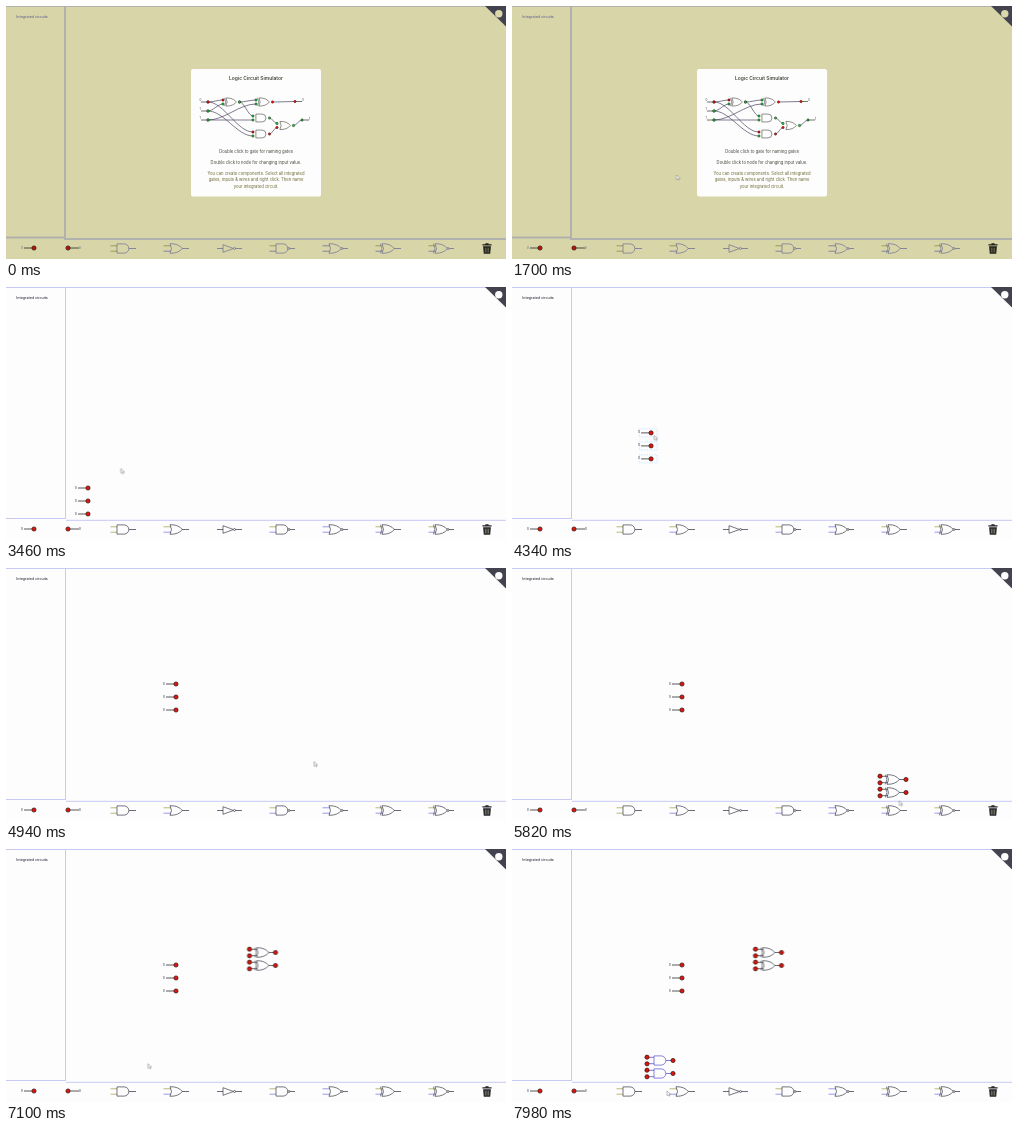
Recreate the animation shown at these times as an HTML page. Size 500 by 253 pixels, loop 8000 ms.

```html
<!DOCTYPE html>
<html lang="en">
<head>
<meta charset="utf-8">
<title>Logic Circuit Simulator</title>
<style>
  html, body { margin: 0; width: 100%; height: 100%; overflow: hidden; background: #fdfdfe; }
  svg { display: block; width: 100vw; height: 100vh; color: #3c3c48; }
  text { font-family: Inter, "Open Sans", sans-serif; fill: currentColor; }
  .body { fill: #fdfdfe; stroke: currentColor; stroke-width: .7; }
  .lead { fill: none; stroke-width: .75; }
  .wire { fill: none; stroke: currentColor; stroke-width: .65; }
  .dot { stroke: #26120f; stroke-width: .7; }
  .pick { fill: none; stroke: #b4dcfa; stroke-width: .6; stroke-dasharray: 1.5 1; }
  #shade { mix-blend-mode: multiply; }
  #dialog { color: #45443a; }
  #dialog .dot { stroke-width: .4; }
  #dialog .wire { stroke: #3b3552; }
</style>
</head>
<body>
<svg id="stage" viewBox="0 0 500 253" preserveAspectRatio="none"></svg>
<script>
const LOOP = 8000;
const PAPER = '#fdfdfe', SAND = '#dad8aa', INK = '#3c3c48';
const RED = '#e3120b', GREEN = '#12c83c', OLIVE = '#a3a04c', BLUE = '#7a7ae0';
const ROW = 13, TRAY_Y = 242.5;

// ---- shapes -------------------------------------------------------------
const repeat = (n, make) => Array.from({ length: n }, (_, i) => make(i)).join('');
const at = (x, y, inner, extra = '') => `<g transform="translate(${x} ${y})" ${extra}>${inner}</g>`;
const line = (x1, y, x2, color = 'currentColor') => `<path class="lead" stroke="${color}" d="M${x1} ${y}H${x2}"/>`;
const dot = (x, y, color = RED, r = 2.1) => `<circle class="dot" cx="${x}" cy="${y}" r="${r}" fill="${color}"/>`;
const label = (x, y, s, size, more = '') => `<text x="${x}" y="${y}" font-size="${size}" ${more}>${s}</text>`;

const BODIES = {
  and: 'M-6-4.6H1.2A4.6 4.6 0 0 1 1.2 4.6H-6Z',
  or: 'M-6-4.8C0-5 4-3 6.3 0C4 3 0 5-6 4.8Q-3 0-6-4.8Z',
  not: 'M-6-3.8L4.5 0L-6 3.8Z',
};

function body(kind) {
  const base = kind === 'not' ? 'not' : kind.endsWith('and') ? 'and' : 'or';
  const inverted = /^x?n/.test(kind);
  return `<path class="body" d="${BODIES[base]}"/>` +
    (kind[0] === 'x' ? '<path class="wire" d="M-7.6-4.8Q-4.6 0-7.6 4.8"/>' : '') +
    (inverted ? `<circle class="body" cx="${base === 'not' ? 5.5 : 7}" r="1"/>` : '');
}

function trayGate(kind, i) {
  const inputs = kind === 'not'
    ? line(-12, 0, -6)
    : line(-12.5, -2.7, -5, kind === 'nor' ? BLUE : OLIVE) + line(-12.5, 2.7, -5, kind === 'and' ? OLIVE : BLUE);
  return at(117 + 53 * i, TRAY_Y, inputs + line(6, 0, 13) + body(kind));
}

const boardGate = kind =>
  line(-12, -3.2, -5) + line(-12, 3.2, -5) + line(6, 0, 13) + body(kind) +
  dot(-13, -3.3) + dot(-13, 3.3) + dot(13, 0);

const inputPin = line(-10, 0, -2, '#202026') + label(-13.2, .6, '0', 3.6) + dot(0, 0);
const outputPin = line(2, 0, 11, '#202026') + label(10.8, .6, '0', 3.6) + dot(0, 0);

const trash =
  '<path fill="#25252a" d="M-4.6-4.2H-1.6V-5.3H1.6V-4.2H4.6V-2.9H-4.6ZM-3.9-2.2H3.9L3.2 5.3H-3.2Z"/>' +
  '<path stroke="#aaa88c" stroke-width=".6" d="M-1.6-.8V4M0-.8V4M1.6-.8V4"/>';

// ---- welcome dialog: a full adder whose node colours follow its logic ----
function fullAdder() {
  const wires = [], parts = [];
  const node = (x, y, on) => parts.push(dot(x, y, on ? GREEN : RED, 1.2));
  const connect = (from, x, y) => {
    const bend = (x - from.x) * .35;
    wires.push(`<path class="wire" d="M${from.x} ${from.y}C${from.x + bend} ${from.y} ${x - bend} ${y} ${x} ${y}"/>`);
    node(from.x, from.y, from.on);
    node(x, y, from.on);
  };
  const input = (y, on) => {
    parts.push(line(195, y, 202) + label(193.5, y - .6, on, 3));
    return { x: 202, y, on };
  };
  const logic = { xor: (p, q) => p ^ q, and: (p, q) => p & q, or: (p, q) => p | q };
  const gate = (kind, x, y, p, q) => {
    connect(p, x - 8, y - 2);
    connect(q, x - 8, y + 2);
    parts.push(at(x, y, `<g transform="scale(.85)">${body(kind)}</g>`));
    return { x: x + 8.5, y, on: logic[kind](p.on, q.on) };
  };
  const output = (from, x, y) => {
    connect(from, x, y);
    parts.push(line(x, y, x + 7) + label(x + 7, y - .4, from.on, 3));
  };

  const a = input(96, 0), b = input(105, 1), c = input(114, 1);
  const half = gate('xor', 225, 96, a, b);
  output(gate('xor', 258, 96, half, c), 289, 95.5);
  const carry = gate('and', 255, 112, half, c);
  output(gate('or', 279, 119.5, carry, gate('and', 255, 128, a, b)), 296, 114);
  return wires.join('') + parts.join('');
}

const centered = (y, s, size = 4.2, more = '') => label(250, y, s, size, 'text-anchor="middle" ' + more);
const dialog =
  `<rect x="185" y="63" width="130" height="127.5" rx="2" fill="${PAPER}"/>` +
  centered(73.6, 'Logic Circuit Simulator', 4.95, 'font-weight="600"') + fullAdder() +
  centered(147.4, 'Double click to gate for naming gates') +
  centered(158.2, 'Double click to node for changing input value.') +
  '<g color="#6a6830">' +
  centered(168.9, 'You can create components. Select all integrated') +
  centered(175.4, 'gates, inputs &amp; wires and right click. Then name') +
  centered(182, 'your integrated circuit.') + '</g>';

// ---- stage --------------------------------------------------------------
const page = `<rect width="500" height="253" fill="${PAPER}"/>` +
  '<path fill="none" stroke="#c9c9f6" d="M0 .5H500M59.5 0V232M0 231.5H59M60 233.3H500"/>' +
  label(10.3, 12.4, 'Integrated circuits', 3.65, 'font-weight="500"') +
  at(28, 242, inputPin) + at(62, 242, outputPin) +
  ['and', 'or', 'not', 'nand', 'nor', 'xor', 'xnor'].map(trayGate).join('') + at(481, TRAY_Y, trash);

// A column of equal parts, each with a selection frame around it.
const column = (id, x, y, count, inner, [left, width, height]) => `<g id="${id}">` +
  `<g id="${id}Pick">` + repeat(count, i =>
    `<rect class="pick" x="${x + left}" y="${y + ROW * i - height / 2}" width="${width}" height="${height}"/>`) + '</g>' +
  repeat(count, i => at(x, y + ROW * i, inner, `id="${id}${i}"`)) + '</g>';

document.getElementById('stage').innerHTML =
  `<g id="page">${page}</g>` +
  column('pin', 82, 201, 3, inputPin, [-12, 18, 8]) +
  column('xor', 381, 211.5, 2, boardGate('xor'), [-7, 22, 13]) +
  `<g color="#5550c8">${column('and', 148, 211.5, 2, boardGate('and'), [-7, 22, 13])}</g>` +
  repeat(2, i => `<rect id="lasso${i}" width="1" height="1" fill="#dcecfc" fill-opacity=".3" stroke="#b4dcfa" stroke-width=".6" vector-effect="non-scaling-stroke"/>`) +
  `<rect id="shade" width="500" height="253" fill="${SAND}"/>` +
  '<path id="edges" fill="none" stroke="#b1b1ae" stroke-width="2" d="M0 0H500M59 0V233H500M0 231.5H59"/>' +
  '<path fill="#434350" d="M479 0H500V20.5Z"/><circle id="badge" cx="492.8" cy="7.8" r="3.7"/>' +
  `<g id="dialog">${dialog}</g>` +
  '<path id="cursor" fill="#fff" stroke="#77777f" stroke-width=".5" d="M0 0V4.6L1.2 3.6L2 5.2L2.9 4.8L2.2 3.3H3.6Z"/>';

// ---- motion -------------------------------------------------------------
// Steps are [time, style]; the first and last styles are held to the loop's ends.
function play(id, ...steps) {
  const all = [[0, steps[0][1]], ...steps, [LOOP, steps.at(-1)[1]]];
  document.getElementById(id).animate(
    all.map(([t, style]) => ({ offset: t / LOOP, ...style })),
    { duration: LOOP, iterations: Infinity });
}
const change = (id, prop, from, to, start, end) => play(id, [start, { [prop]: from }], [end, { [prop]: to }]);
const shift = (x, y) => ({ transform: `translate(${x}px, ${y}px)` });
const hidden = { visibility: 'hidden' }, visible = { visibility: 'visible' };
const show = (id, from, to = LOOP) =>
  play(id, [from, hidden], [from, visible], [to, visible], ...(to < LOOP ? [[to, hidden]] : []));

const path = [];
const go = (t, x, y) => path.push([t, shift(x, y)]);

// Click a tray item several times; each click adds one part to the board.
function place(id, x, arrive, clicks) {
  go(arrive, x, 240.5);
  clicks.forEach((t, i) => show(id + i, t));
  go(clicks.at(-1) + 40, x, 240.5);
}

function lasso(id, start, end, x, y, w, h) {
  const box = (sx, sy) => ({ transform: `translate(${x}px, ${y}px) scale(${sx}, ${sy})` });
  go(start, x, y);
  play(id, [start, { ...box(0, 0), ...hidden }], [start, { ...box(0, 0), ...visible }],
    [end, { ...box(w, h), ...visible }], [end, { ...box(w, h), ...hidden }]);
  go(end, x + w, y + h);
}

function drag(id, start, end, x, y, dx, dy) {
  go(start, x, y);
  play(id, [start, shift(0, 0)], [end, shift(dx, dy)]);
  show(id + 'Pick', start - 80, end + 40);
  go(end, x + dx, y + dy);
}

// Closing the dialog
change('shade', 'opacity', 1, 0, 2180, 2400);
change('edges', 'opacity', 1, 0, 2180, 2400);
change('dialog', 'opacity', 1, 0, 2180, 2340);
change('badge', 'fill', SAND, PAPER, 2180, 2400);
change('page', 'color', '#8080d8', INK, 2180, 2400);

show('cursor', 20);
go(20, 321, 205);
go(500, 240, 112);
go(760, 240, 112);
go(1300, 88, 193);
go(1560, 163, 171);
go(1700, 164.5, 169);
go(2300, 164.5, 169);

place('pin', 26, 2860, [2920, 3080, 3220]);
go(3440, 114.5, 181);
lasso('lasso0', 3480, 3700, 115, 182, -50, 50);
drag('pin', 3900, 4580, 85, 203.5, 88, -85);
go(4700, 240, 150);

place('xor', 381, 5200, [5300, 5480]);
go(5820, 387, 233);
lasso('lasso1', 5940, 6100, 408, 200, -46, 32);
drag('xor', 6200, 6860, 368, 217, -124.5, -108);

show('andPick', LOOP);
place('and', 117, 7160, [7300, 7600]);
go(7780, 117, 240.5);
go(7980, 155, 242);
play('cursor', ...path);
</script>
</body>
</html>
```
